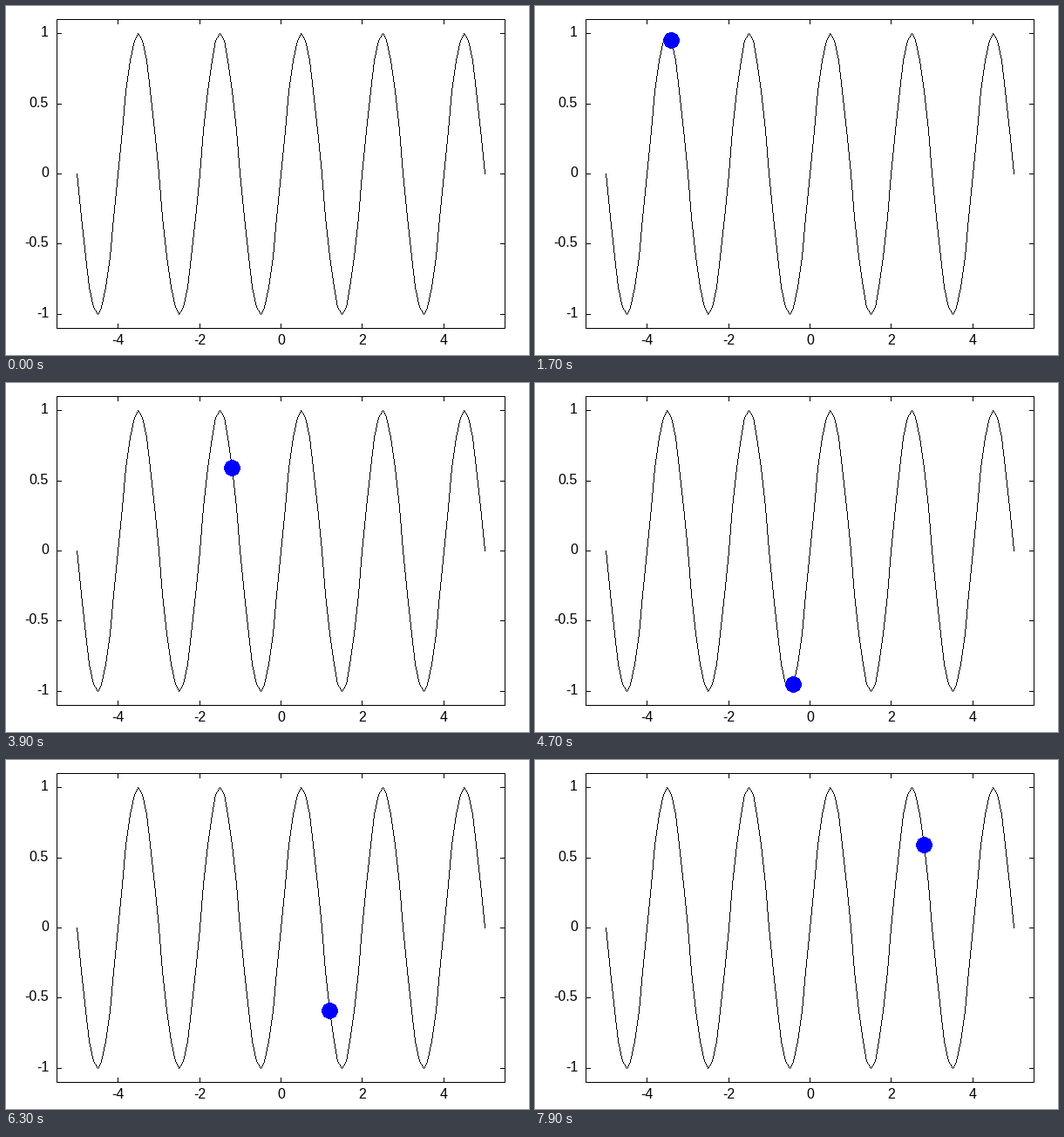
A matplotlib script that plays this animation: 600x400 px, repeating every 8 s.

```python
import matplotlib.pyplot as plt
import numpy as np
from matplotlib.animation import FuncAnimation
from matplotlib.patches import Circle

W, H, DPI = 600, 400, 100
FRAMES, INTERVAL = 80, 100
LEFT, RIGHT, BOTTOM, TOP = 58, 572, 30, 384   # plot box, y counted upwards
PX = 72 / DPI                                 # one pixel in points
TICK = 5


def nearest(v):
    return np.floor(v + 0.5)


def to_px(x, y):
    """Map data values to whole pixel centres."""
    return (nearest(LEFT + (x + 5.5) * (RIGHT - LEFT) / 11),
            nearest(BOTTOM + (y + 1.1) * (TOP - BOTTOM) / 2.2))


def wave(x):
    return np.sin(np.pi * x)


def trace(xs, ys):
    """Pixels of a stepped polyline, one per step along the longer side."""
    pts = set()
    for x0, y0, x1, y1 in zip(xs, ys, xs[1:], ys[1:]):
        n = int(max(abs(x1 - x0), abs(y1 - y0))) + 1
        pts.update(zip(nearest(np.linspace(x0, x1, n)),
                       nearest(np.linspace(y0, y1, n))))
    return np.array(sorted(pts)).T


fig = plt.figure(figsize=(W / DPI, H / DPI), dpi=DPI, facecolor="white")
ax = fig.add_axes([0, 0, 1, 1])
ax.set_xlim(-0.5, W - 0.5)
ax.set_ylim(-0.5, H - 0.5)
ax.set_autoscale_on(False)
ax.axis("off")


def line(xs, ys):
    ax.plot(xs, ys, color="black", lw=PX, snap=False,
            solid_capstyle="projecting", solid_joinstyle="miter")


def label(x, y, text, ha):
    ax.text(x, y, text, ha=ha, va="baseline", color="black",
            family="Liberation Sans", fontsize=16 * PX)


line([LEFT, RIGHT, RIGHT, LEFT, LEFT], [BOTTOM, BOTTOM, TOP, TOP, BOTTOM])

for v in (-4, -2, 0, 2, 4):
    x, _ = to_px(v, 0)
    line([x, x], [BOTTOM, BOTTOM + TICK])
    line([x, x], [TOP, TOP - TICK])
    label(x, 11.5, f"{v}", "center")

for v in (-1, -0.5, 0, 0.5, 1):
    _, y = to_px(0, v)
    line([LEFT, LEFT + TICK], [y, y])
    line([RIGHT, RIGHT - TICK], [y, y])
    label(48.5, y - 3.5, f"{v:g}", "right")

xs = np.linspace(-5, 5, 101)
cx, cy = trace(*to_px(xs, wave(xs)))
ax.hlines(cy, cx - 0.5, cx + 0.5, color="black", lw=PX, snap=False,
          capstyle="butt")

dot = Circle((0, 0), 8.7, facecolor="blue", edgecolor="none",
             antialiased=False, zorder=5, visible=False)
ax.add_patch(dot)


def update(i):
    # The dot is absent first, then moves 0.1 along x per frame.
    x = -5 + 0.1 * (i - 1)
    dot.set_visible(i > 0)
    dot.center = to_px(x, wave(x))
    return (dot,)


anim = FuncAnimation(fig, update, frames=FRAMES, interval=INTERVAL,
                     repeat=True, repeat_delay=0, blit=False)
plt.show()
```
